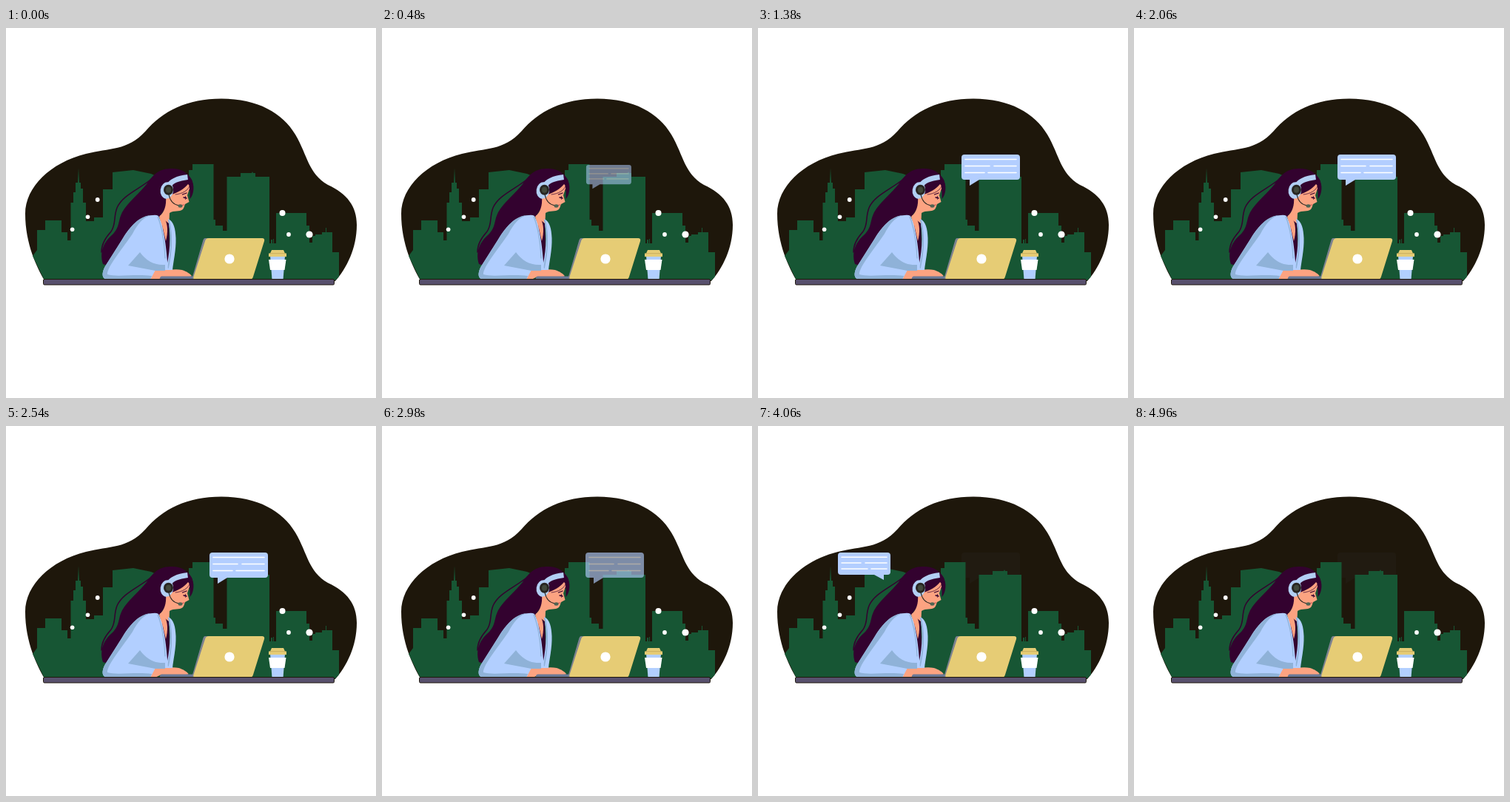
Animation of 500x500 px, one loop 5000 ms. Source, as an HTML page:

```html
<!DOCTYPE html>
<html lang="en">
<head>
<meta charset="utf-8">
<title>Support desk</title>
<style>
  html, body { margin: 0; width: 100%; height: 100%; overflow: hidden; background: #fff; }
  svg { display: block; width: 100%; height: 100%; }
  .line { fill: none; stroke-linecap: round; stroke-linejoin: round; }
</style>
</head>
<body>
<svg viewBox="0 0 500 500">
  <path fill="#1e170b" d="M52 341C42 324 26 292 26 251C26 215 60 182 108 170C140 162 164 166 188 140C212 112 245 95.500 291 95.500C340 95.500 374 115 391 144C408 173 408 196 435 212C461 224 474 241 474 266C474 298 460 325 445 342Z"/>
  <path id="ghost" fill="#b3ceff" opacity=".025" d="M279 171H350Q354 171 354 175V201Q354 205 350 205H299L286 213V205H279Q275 205 275 201V175Q275 171 279 171Z"/>

  <path id="city" fill="#175634" d="M52 341L36 308L42 300V273H53V260H75V276H83V287H87.500V236H91V222H94V209H97L98 189L99 209H101V217H104V236H108V261H119V256H131V218H144V195L172 192L196 197L215 205H247V192H252V184H280.500V259H283V267H293V274H298.500V201H317V196H332L333 194L334 196H337V201H356V291H358V286H360V291H361V285H362V291H365V250H406V267H410V290H414V281H418V279H427V276H432V270H433V276H441V303H450V336L445 341Z"/>

  <g id="dots" fill="#fff">
    <circle cx="123.700" cy="232" r="2.900"/>
    <circle cx="110.500" cy="255.200" r="2.800"/>
    <circle cx="89.600" cy="272.200" r="2.800"/>
    <circle cx="382" cy="279" r="2.900"/>
    <circle cx="410" cy="279" r="4.600"/>
    <circle id="blinker" cx="373.500" cy="250" r="4"/>
  </g>

  <g id="hair" fill="#33022f">
    <path d="M222 190C205 190 197 201 190 211C180 224 164 236 157 249C151 261 154 269 144 279C132 289 126 303 131 319L150 325L198 268L222 235L240 222C252 222 254 211 251 205C246 195 235 189 222 190Z"/>
    <path class="line" stroke="#33022f" stroke-width="1.500" d="M199 202C181 218 158 225 150 243C145 256 149 265 142 275C134 284 129 292 129 303"/>
  </g>

  <g id="face">
    <path fill="#fca381" d="M216 228C217 240 214 249 207 255L211 270L218 289L220 272L221 250C227 246 234 249 239 245C241 242 241 240 242 238L247.500 235L245 226L249 214L246 211C240 218 233 222 224 225Z"/>
    <path fill="#33022f" d="M245 204C248 211 249 219 248.500 231C254 225 255.500 212 250 204Z"/>
    <path class="line" stroke="#33022f" stroke-width=".7" d="M249 211C247 220 238 224 229 225"/>
    <path class="line" stroke="#33022f" stroke-width="1.300" d="M238.500 225L244 223M240 229L244 230M242.500 228V231"/>
    <path class="line" stroke="#c94b50" stroke-width="1" d="M237.500 239.500L240.500 239"/>
  </g>

  <g id="headset">
    <path class="line" stroke="#b2cff4" stroke-width="7" style="stroke-linecap: butt" d="M220 213C224 206 233 203 245.500 201.500"/>
    <ellipse cx="217.500" cy="219.500" rx="8.800" ry="11.300" fill="#b2cff4" transform="rotate(8 217 219)"/>
    <ellipse cx="219.500" cy="218.800" rx="6.500" ry="7" fill="#282622"/>
    <ellipse cx="219.500" cy="218.800" rx="3.500" ry="4" fill="#41483b"/>
    <path class="line" stroke="#282622" stroke-width="1.100" d="M220 225C222 235 227 239 234 240"/>
    <ellipse cx="235.500" cy="240.500" rx="3" ry="2.200" fill="#506453"/>
  </g>

  <path id="hand" fill="#fca381" d="M194 329L207 326C217 328 229 325 238 327C244 329 249 332 251 335Q251 336 248 336H214L208 339H194Z"/>
  <path fill="#6a7896" d="M210 335.500H255V340H208Q207 337 210 335.500Z"/>

  <g id="jacket">
    <path fill="#33022f" d="M211 257L220 264L222 318L214 314Z"/>
    <path fill="#fca381" d="M208 253L214 257C219 265 219 276 216 288Z"/>
    <path fill="#b2cfff" d="M219 258C227 261 229 272 229.500 284C230 300 226 316 225 327L216 327C221 306 224 283 219 258Z"/>
    <path class="line" stroke="#8fb2d8" stroke-width="1.800" d="M220 260C225 281 223 306 219 324"/>
    <path fill="#b2cfff" d="M198 253C180 254 168 268 158 284L134 322C129 331 129 339 137 340H195L202 327H219C217 300 214 270 206 254Q203 252 198 253Z"/>
    <path fill="#8fb2d8" d="M195 253C178 255 167 270 157 286L134 322C129 331 129 340 138 340H195L197 335C175 332 150 337 137 333C136 323 160 295 171 278C178 265 184 257 195 253ZM181 303L165 321L202 328H215V320C200 321 189 314 181 303Z"/>
    <path class="line" stroke="#8fb2d8" stroke-width="1.200" d="M205 255C211 270 214 289 215 311"/>
  </g>

  <g id="laptop">
    <path fill="#7d8290" d="M269 284H274L258 340H254Q251 340 252 336L266 288Q267 284 269 284Z"/>
    <path fill="#e6cc75" d="M274 284H346Q350 284 349 288L334 336Q333 340 329 340H256Q252.500 340 253.500 336L269 288Q270 284 274 284Z"/>
    <circle cx="302" cy="312" r="6.600" fill="#fff"/>
  </g>

  <g id="cup">
    <path fill="#b2cfff" d="M357 308H377L374.500 340H359.500Z"/>
    <path fill="#fff" d="M355 313H378.500L376.500 327H357Z"/>
    <path fill="#e6cc75" d="M359 300H375L377 304.500H379V309H355V304.500H357Z"/>
    <path stroke="#bca255" stroke-width=".7" d="M356 304.700H378"/>
  </g>

  <rect x="50.500" y="339.500" width="393" height="7.500" rx="1.500" fill="#58506d" stroke="#1e170b"/>

  <g id="right">
    <path fill="#b3ceff" d="M279 171H350Q354 171 354 175V201Q354 205 350 205H299L286 213V205H279Q275 205 275 201V175Q275 171 279 171Z"/>
    <path class="line" stroke="#fff" stroke-width="1.600" d="M280 177.500H349M280 186.500H313M319 186.500H349M280 195.500H306M311 195.500H349"/>
  </g>
  <g id="left">
    <path fill="#b3ceff" d="M112 171H175Q179 171 179 175V197Q179 201 175 201H170V208L157 201H112Q108 201 108 197V175Q108 171 112 171Z"/>
    <path class="line" stroke="#fff" stroke-width="1.500" d="M113 177.200H174M113 185H139M145 185H174M113 193H148M153 193H174"/>
  </g>
</svg>
<script>
  const LOOP = 5000, TYPE_END = 4760, STROKE = 340;
  const el = id => document.getElementById(id);
  const [right, left, hand, ghost, blinker] =
    ['right', 'left', 'hand', 'ghost', 'blinker'].map(el);
  const ramp = (t, a, b) => Math.min(1, Math.max(0, (t - a) / (b - a)));

  // Bubbles grow near their tail, then fade at full size.
  function bubble(node, x, y, small, grow, fade) {
    const s = small + (1 - small) * grow;
    node.setAttribute('transform', `translate(${x} ${y}) scale(${s}) translate(${-x} ${-y})`);
    node.setAttribute('opacity', grow * (1 - fade));
  }

  function draw(t) {
    bubble(right, 279, 232, 0.5, ramp(t, 220, 700), ramp(t, 2800, 3300));
    bubble(left, 161, 206, 0.1, ramp(t, 3020, 3454), ramp(t, 4300, TYPE_END));
    const phase = Math.min(t, TYPE_END) / STROKE * 2 * Math.PI;
    hand.setAttribute('transform', `translate(${-2.2 * (1 - Math.cos(phase))} 0)`);
    ghost.style.display = t < 3300 ? 'none' : '';
    blinker.style.display = t < 4960 ? '' : 'none';
  }

  const start = performance.now();
  function tick() {
    draw((performance.now() - start) % LOOP);
    requestAnimationFrame(tick);
  }
  tick();
</script>
</body>
</html>
```
